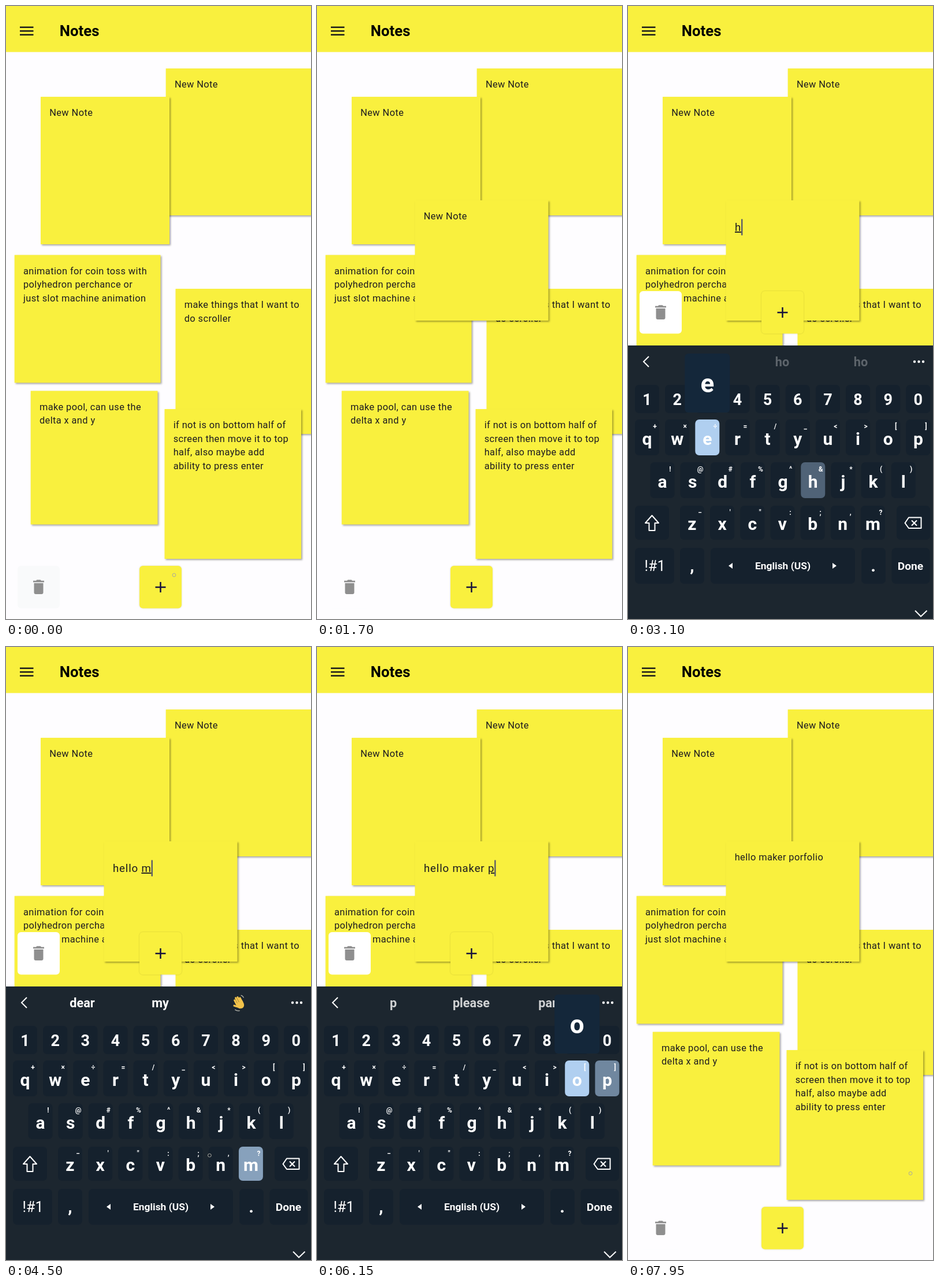
These frames come from a looping animation (528 px wide and 1060 px high, 8000 ms). An HTML page:

```html
<!DOCTYPE html>
<html lang="en">
<head>
<meta charset="utf-8">
<title>Notes</title>
<style>
  html, body { margin: 0; width: 100%; height: 100%; overflow: hidden; background: #fefdff; }
  svg { display: block; width: 100%; height: 100%; font-family: Roboto, sans-serif; }
  text { white-space: pre; }
  .paper { filter: drop-shadow(2px 2.5px 1.5px rgba(0, 0, 0, .34)); }
  .note text { font-size: 16.4px; letter-spacing: .4px; fill: #1d1b20; }
  .note .edit { font-size: 18.7px; letter-spacing: .8px; }
  .word { text-decoration: underline; text-decoration-thickness: 1.3px; }
  .keys text, .bar text { fill: #fff; font-weight: 700; text-anchor: middle; }
  .line { fill: none; stroke: #fff; stroke-width: 2; }
</style>
</head>
<body>
<svg id="stage" viewBox="0 0 528 1060" preserveAspectRatio="none"></svg>
<script>
const LOOP = 8000, TAP = 1660, OPEN = 1950, CLOSE = 7700;
const KEYBOARD_TOP = 587, LIFT = 475;
const stage = document.getElementById('stage');

function el(parent, tag, attrs = {}, content = '') {
  const node = document.createElementNS('http://www.w3.org/2000/svg', tag);
  for (const name in attrs) node.setAttribute(name, attrs[name]);
  node.textContent = content;
  return parent.appendChild(node);
}
const box = (parent, x, y, width, height, fill, rx = 0) =>
  el(parent, 'rect', { x, y, width, height, fill, rx });
const label = (parent, x, y, size, content, more = {}) =>
  el(parent, 'text', { x, y, 'font-size': size, ...more }, content);
const show = (node, visible) => node.setAttribute('visibility', visible ? 'visible' : 'hidden');
const clamp = v => Math.max(0, Math.min(1, v));
const smooth = v => { v = clamp(v); return v * v * (3 - 2 * v); };
const easeOut = v => 1 - (1 - clamp(v)) ** 3;

// Notes
function addNote(x, y, width, height, ...lines) {
  const note = el(stage, 'g', { class: 'note' });
  box(note, x, y, width, height, '#f9f03e').classList.add('paper');
  lines.forEach((line, i) => el(note, 'text', { x: x + 15.2, y: y + 33 + i * 23.6 }, line));
  return note;
}
addNote(276.7, 108, 260, 254, 'New Note');
addNote(60, 157, 223, 255, 'New Note');
addNote(14.7, 430.5, 252.8, 221, 'animation for coin toss with', 'polyhedron perchance or', 'just slot machine animation');
addNote(293.5, 489, 250, 251, 'make things that I want to', 'do scroller');
addNote(42.7, 665.5, 219.8, 231, 'make pool, can use the', 'delta x and y');
addNote(274.5, 697, 236.5, 259, 'if not is on bottom half of', 'screen then move it to top', 'half, also maybe add', 'ability to press enter');

const fresh = addNote(169.5, 336, 231, 208, 'New Note');
const title = fresh.querySelector('text');
const edit = el(fresh, 'text', { x: 185, y: 389, class: 'edit' });
const doneWords = el(edit, 'tspan');
const word = el(edit, 'tspan', { class: 'word' });
const caret = box(fresh, 185, 368.5, 2.3, 28, '#55566c');

// Header
box(stage, 0, 0, 528, 79.6, '#f9f03e');
label(stage, 92.7, 52, 25.8, 'Notes', { 'font-weight': 700 });
el(stage, 'path', { d: 'M24 36.7H47.5M24 43.2H47.5M24 49.7H47.5', stroke: '#1a1a1a', 'stroke-width': 2.6 });

// Floating buttons
const buttons = el(stage, 'g');
const trash = box(buttons, 20, 968, 73, 73.5, '#fff', 6);
el(buttons, 'path', {
  d: 'M48.5 998H64.5V1014Q64.5 1017 61.5 1017H51.5Q48.5 1017 48.5 1014ZM47 993.7H52L53.3 992.2H59.7L61 993.7H66V996.4H47Z',
  fill: '#8f8f8f'
});
box(buttons, 231, 968, 73, 73.5, '#f9f03e', 6).style.filter = 'drop-shadow(0 .6px .8px rgba(0,0,0,.16))';
el(buttons, 'path', { d: 'M258.5 1005H276.5M267.5 996V1014', stroke: '#17123c', 'stroke-width': 2.5 });

// Keyboard
const keyboard = el(stage, 'g');
box(keyboard, 0, KEYBOARD_TOP, 528, 474, '#1c262f');
const keyLayer = el(keyboard, 'g', { class: 'keys' });
const keys = {};

function addKey(name, x, y, width, height) {
  box(keyLayer, x - width / 2, y, width, height, '#15212d', 7);
  const glow = box(keyLayer, x - width / 2, y, width, height, '#b0cff0', 7);
  keys[name] = { x, y, cy: y + height / 2, glow };
}
function addRow(letters, marks, x0, top, height, baseline, size) {
  [...letters].forEach((letter, i) => {
    const x = x0 + i * 52.15;
    addKey(letter, x, top, 42, height);
    label(keyLayer, x, baseline, size, letter);
    if (marks[i]) label(keyLayer, x + 13.5, top + 16, 12, marks[i]);
  });
}
addRow('1234567890', '', 33, 655, 49, 689.5, 27);
addRow('qwertyuiop', '+×÷=/_<>[]', 33, 715, 62, 759, 30);
addRow('asdfghjkl', '!@#%^&*()', 59.5, 789, 62, 832.5, 30);
addRow('zxcvbnm', '−\'":;,?', 111, 864, 59, 906, 30);
addKey('shift', 41.5, 864, 59, 59);
addKey('back', 494, 864, 58, 59);
addKey('sym', 46, 937, 68, 62);
addKey(',', 111, 937, 42, 62);
addKey(' ', 268, 937, 250, 62);
addKey('.', 425, 937, 42, 62);
addKey('done', 489.5, 937, 66, 62);
label(keyLayer, 46.5, 977, 25, '!#1', { style: 'font-weight:400' });
label(keyLayer, 111, 978, 30, ',');
label(keyLayer, 424.5, 978, 30, '.');
label(keyLayer, 268, 974, 17.4, 'English (US)');
label(keyLayer, 489, 974.5, 19.2, 'Done');
el(keyLayer, 'path', { d: 'M181 963V973L174 968ZM354 963V973L361 968Z', fill: '#fff' });
el(keyLayer, 'path', {
  class: 'line', 'stroke-linejoin': 'round',
  d: 'M41.5 881L53 894H46.5V907H36.5V894H30ZM486 884.5H507.5V903H486L479.5 894ZM491 889.5L500 898.5M500 889.5L491 898.5'
});
el(keyLayer, 'path', { class: 'line', d: 'M497 1045.5L507 1055.5L517.5 1045.5' });

// Suggestion bar
const bar = el(keyboard, 'g', { class: 'bar' });
el(bar, 'path', { class: 'line', d: 'M36 606L27 615L36 624' });
for (const x of [496, 503.5, 511]) el(bar, 'circle', { cx: x, cy: 615, r: 2.2, fill: '#fff' });
const slots = [132, 267, 403].map(x => label(bar, x, 623, 21.7, ''));
const wave = el(bar, 'g', { transform: 'translate(403 616) rotate(-28)', stroke: '#f2c24a', 'stroke-linecap': 'round' });
el(wave, 'path', { d: 'M-4 0V-8M-.5 0V-10.5M3 0V-10M6 1V-7M-4 5L-9 0', 'stroke-width': 3.2 });
el(wave, 'path', { d: 'M-5 -1H7V4Q6 10 1 10Q-4 9 -5 4Z', fill: '#f2c24a', 'stroke-width': 1 });
el(wave, 'path', { d: 'M-11 7Q-9 11 -5 12M10 -10Q12 -8 12 -5', fill: 'none', stroke: '#b9b9b0', 'stroke-width': 1.3 });

// Key preview
const popup = el(keyboard, 'g', { class: 'keys' });
box(popup, -39, -114, 78, 102, '#14273a', 6);
const popupLetter = label(popup, 0, -47, 44, '');

const cursor = el(stage, 'circle', { r: 2.9, fill: 'none', stroke: '#a9a9a0', 'stroke-width': 1 });

const typed = [
  ['hello ', [2830, 3050, 3350, 3520, 3750, 4050]],
  ['maker ', [4350, 4700, 4880, 5120, 5280, 5650]],
  ['porfolio', [5950, 6100, 6230, 6340, 6450, 6550, 6890, 7080]]
];
const presses = typed.flatMap(([chars, times]) => times.map((t, i) => ({ t, key: chars[i] })));
presses.push({ t: 7550, key: 'done' });

const suggestions = [
  [0, 'I', 'The', 'Hello'],
  [2920, 'h', 'hi', 'how'],
  [3085, 'he', 'ho', 'ho'],
  [3440, 'hello', 'help', 'hell'],
  [4140, 'dear', 'my', 'wave'],
  [4790, 'ma', 'may', 'made'],
  [4970, 'make', 'makes', 'mate'],
  [5600, 'maker', 'makers', 'make'],
  [5740, 'of', 'and', 'is'],
  [6040, 'p', 'please', 'part'],
  [6330, 'por', 'for', 'port'],
  [6570, 'porfo', 'portfolio', 'porro', true],
  [7170, 'porfolio', 'portfolio', 'portfolios', true]
];

const stops = [
  { t: 0, x: 291, y: 984 },
  { t: 400, x: 275, y: 1003, tap: true },
  { t: TAP, x: 285, y: 430, tap: true },
  ...presses.map(({ t, key }) => ({ t, x: keys[key].x, y: keys[key].cy, tap: true })),
  { t: 8040, x: 489, y: 905 }
];

function drawCursor(t) {
  const i = stops.findLastIndex(s => s.t <= t);
  const from = stops[i], to = stops[i + 1];
  const u = smooth((t - from.t - 80) / (to.t - from.t - 100));
  cursor.setAttribute('cx', from.x + (to.x - from.x) * u);
  cursor.setAttribute('cy', from.y + (to.y - from.y) * u);
  show(cursor, !(from.tap && t - from.t < 80));
}

function drawNote(t) {
  const editing = t >= 1850 && t < CLOSE;
  show(fresh, t >= 520);
  show(title, t >= 520 && !editing);
  show(edit, editing);
  show(caret, editing);
  const written = presses.filter(p => p.key !== 'done' && t >= p.t + 90).map(p => p.key).join('');
  title.textContent = t >= CLOSE ? written : 'New Note';
  const split = written.lastIndexOf(' ') + 1;
  doneWords.textContent = written.slice(0, split);
  word.textContent = written.slice(split);
  caret.setAttribute('x', 185 + (written ? edit.getComputedTextLength() : 0));
}

function drawKeyboard(t) {
  const raised = easeOut((t - OPEN) / 300) * (1 - easeOut((t - CLOSE) / 200));
  keyboard.setAttribute('transform', `translate(0 ${LIFT * (1 - raised)})`);
  show(keyboard, raised > 0);
  buttons.setAttribute('transform', `translate(0 ${-LIFT * raised})`);
  trash.setAttribute('fill', t < 1000 ? '#f9fafb' : raised > 0 ? '#fff' : '#fefdff');

  for (const name in keys) keys[name].glow.setAttribute('opacity', 0);
  for (const p of presses) {
    const age = t - p.t;
    if (age >= 0 && age < 400) keys[p.key].glow.setAttribute('opacity', clamp(1 - (age - 60) / 340));
  }
  const held = presses.find(p => t >= p.t && t < p.t + 110 && /^[a-z]$/.test(p.key));
  popup.setAttribute('display', held ? 'inline' : 'none');
  if (held) {
    const { x, y } = keys[held.key];
    popup.setAttribute('transform', `translate(${x} ${y})`);
    popupLetter.textContent = held.key;
  }

  const [start, ...words] = suggestions.findLast(s => s[0] <= t);
  slots.forEach((slot, i) => {
    slot.textContent = words[i] === 'wave' ? '' : words[i];
    slot.style.fill = i === 1 && words[3] ? '#4f9cf0' : '#fff';
    slot.setAttribute('opacity', .2 + .8 * clamp((t - start) / 150));
  });
  wave.setAttribute('display', words[2] === 'wave' ? 'inline' : 'none');
}

function render(t) {
  drawNote(t);
  drawKeyboard(t);
  drawCursor(t);
}

const origin = performance.now();
function frame() {
  render((performance.now() - origin) % LOOP);
  requestAnimationFrame(frame);
}
render(0);
requestAnimationFrame(frame);
</script>
</body>
</html>
```
